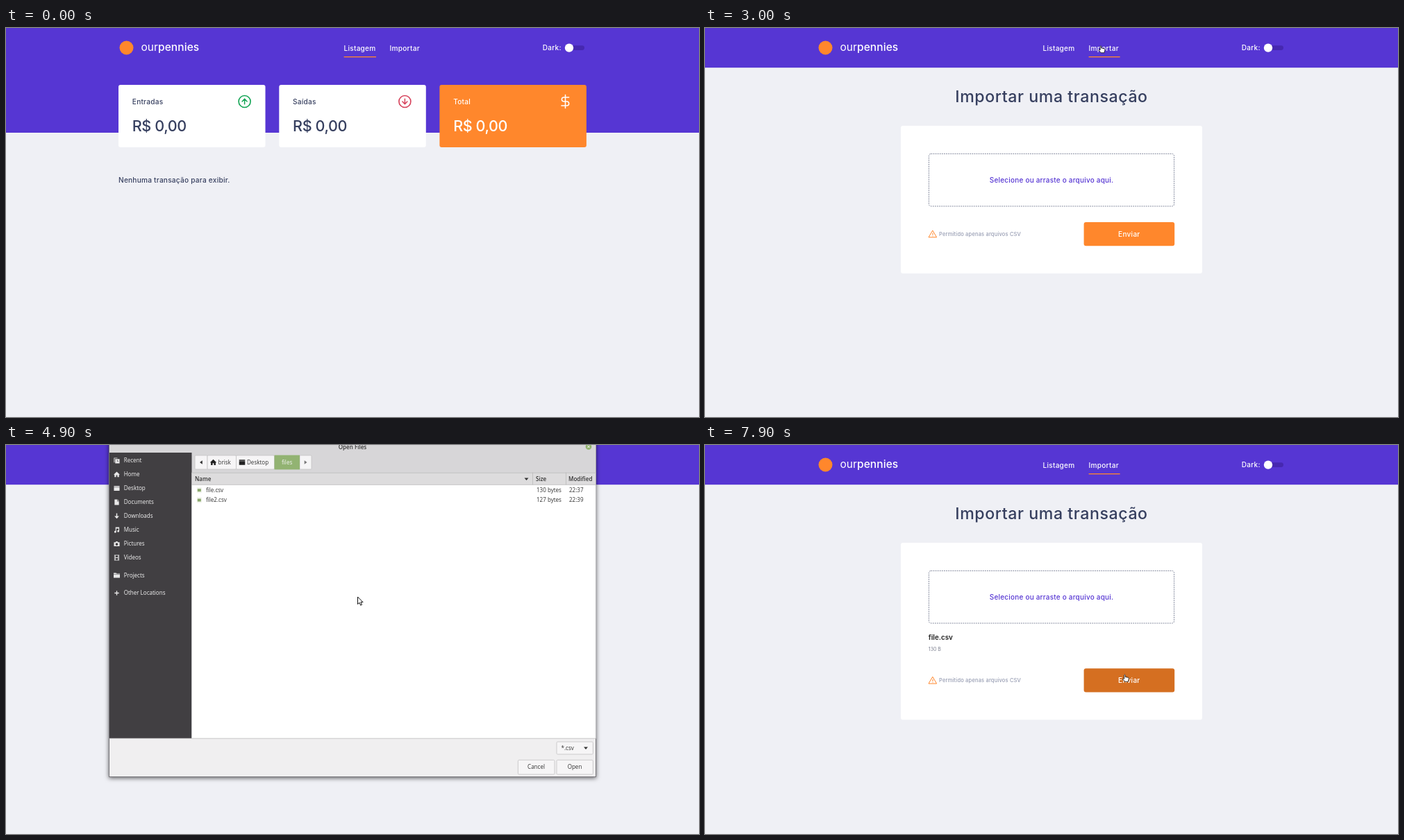
These frames come from a looping animation (998x561 px, 8 s). An HTML page:

```html
<!DOCTYPE html>
<html lang="pt-BR">
<head>
<meta charset="utf-8">
<title>Importar uma transação</title>
<style>
  html, body { margin: 0; width: 100%; height: 100%; overflow: hidden; background: #eff0f5; }
  svg { display: block; width: 998px; height: 561px; }
  text { font: 500 10.1px Inter, sans-serif; letter-spacing: .024em; fill: #363f5f; }
  .mid { text-anchor: middle; }
  .light { fill: #fff; }
  .money { font-size: 21.6px; letter-spacing: -.02em; }
  .title { font-size: 23.2px; }
  .brand { font-size: 15.5px; letter-spacing: .005em; }
  .thin { font-weight: 400; }
  .drop { font-size: 10px; letter-spacing: .02em; fill: #5636d3; }
  .note { font-size: 7.5px; fill: #969cb2; }
  .size { font-size: 7px; letter-spacing: 0; font-weight: 400; fill: #7d8090; }
  .name { font-size: 9.7px; letter-spacing: 0; font-weight: 700; fill: #333; }
  .line { fill: none; stroke-linecap: round; stroke-linejoin: round; }
  #dialog text { font: 400 8.05px "Open Sans", sans-serif; letter-spacing: 0; fill: #333; }
  #dialog .light { fill: #f4f4f4; }
  #dialog .bold { font-weight: 600; }
  #dialog .box { fill: #f6f5f6; stroke: #c3c2c3; stroke-width: .8; }
  #dialog .icon { fill-rule: evenodd; }
</style>
</head>
<body>
<svg id="stage" viewBox="0 0 998 561"></svg>
<script>
const DURATION = 8000, ORANGE = [255, 135, 44], DARK_ORANGE = [213, 111, 33];
const text = (x, y, s, cls = '') => `<text x="${x}" y="${y}" class="${cls}">${s}</text>`;
const rect = (x, y, w, h, fill, r = 0) =>
  `<rect x="${x}" y="${y}" width="${w}" height="${h}" rx="${r}" fill="${fill}"/>`;
const line = (d, color, w = 1.5) => `<path class="line" d="${d}" stroke="${color}" stroke-width="${w}"/>`;
const box = (x, y, w, h) => `<rect class="box" x="${x}" y="${y}" width="${w}" height="${h}" rx="1.5"/>`;
const icon = (x, y, d, fill, scale = 1) =>
  `<path class="icon" transform="translate(${x} ${y}) scale(${scale})" d="${d}" fill="${fill}"/>`;

const SHAPES = {
  recent: 'M-4.5-4.5H1V-3.5H-3.5V3H-4.5ZM-2.5-2.5H4.5V4.5H-2.5ZM.5-1V1.5H3V.7H1.3V-1Z',
  home: 'M-5 .3L0-4.5 5 .3H3.6V4.2H1V1.2H-1V4.2H-3.6V.3Z',
  desktop: 'M-4.5-4H4.5V-2.5H-4.5ZM-4.5-1.9H4.5V4H-4.5Z',
  page: 'M-3.5-4.5H.7V-1.5H3.5V4.5H-3.5ZM1.3-4.5L3.5-2.1H1.3Z',
  down: 'M-.8-4.5H.8V0H3.8L0 4.2-3.8 0H-.8Z',
  music: 'M-2-4.5H4V2A1.6 1.6 0 1 1 2.8.5V-2.2H-.8V3A1.6 1.6 0 1 1-2 1.5Z',
  camera: 'M-4.5-2.5H-2L-1-4H1L2-2.5H4.5V3.8H-4.5ZM0-1.3a2 2 0 1 0 .01 0Z',
  film: 'M-4-4.5H4V4.5H-4ZM-1.8-3.5V-.5H1.8V-3.5ZM-1.8.5V3.5H1.8V.5ZM-3.2-3.5V3.5H-2.6V-3.5ZM2.6-3.5V3.5H3.2V-3.5Z',
  folder: 'M-5-4H-1L0-2.8H5V-2H-5ZM-5-1.5H5V4H-5Z',
  plus: 'M-.7-3.5H.7V-.7H3.5V.7H.7V3.5H-.7V.7H-3.5V-.7H-.7Z'
};

function card(x, label, back, cls, mark) {
  return rect(x, 82, 211.5, 90, back, 3) + text(x + 19.8, 109.7, label, cls) +
    text(x + 19.8, 149.2, 'R$ 0,00', 'money ' + cls) + mark;
}

function roundArrow(x, color, dir) {
  return `<circle cx="${x}" cy="106" r="8.5" fill="none" stroke="${color}" stroke-width="1.6"/>` +
    line(`M${x} ${106 - 3.7 * dir}V${106 + 3.7 * dir}M${x - 3.5} 106L${x} ${106 - 3.7 * dir}L${x + 3.5} 106`, color);
}

const dollar = `<path class="line" transform="translate(795.2 95.7) scale(.86)" stroke="#fff" stroke-width="1.8"
  d="M12 1V23M18 5H9.5a3.5 3.5 0 0 0 0 7h5a3.5 3.5 0 0 1 0 7H5.5"/>`;

const header = `
  <rect id="band" width="998" fill="#5636d3"/>
  <circle cx="173.5" cy="28.5" r="10" fill="#ff872c"/>
  <text x="194.5" y="33" class="brand light"><tspan class="thin">our</tspan>pennies</text>
  ${text(486.5, 32.7, 'Listagem', 'light')}${text(552.6, 32.7, 'Importar', 'light')}
  <rect id="underline" y="41" height="1.3" fill="#ff872c"/>
  ${text(772.7, 32.2, 'Dark:', 'light')}
  ${rect(807, 25.2, 26, 6.8, '#4628b0', 3.4)}<circle cx="811" cy="28.6" r="6.2" fill="#fff"/>`;

const listing = `<g id="listing">
  ${card(162, 'Entradas', '#fff', '', roundArrow(343.6, '#12a454', 1))}
  ${card(393.3, 'Saídas', '#fff', '', roundArrow(574.4, '#d6405a', -1))}
  ${card(624.4, 'Total', '#ff872c', 'light', dollar)}
  ${text(162, 223.3, 'Nenhuma transação para exibir.')}
</g>`;

const form = `<g id="form">
  ${text(499, 107, 'Importar uma transação', 'title mid')}
  <rect id="panel" x="282" y="141" width="434" rx="3" fill="#fff"/>
  <rect x="322.4" y="181.4" width="353.2" height="75.6" rx="3" fill="none" stroke="#82889c"
    stroke-width="1" stroke-dasharray="1.9 1.2"/>
  ${text(499, 222.6, 'Selecione ou arraste o arquivo aqui.', 'drop mid')}
  <g id="chosen">${text(321.8, 281.2, 'file.csv', 'name')}${text(321.8, 296.6, '130 B', 'size')}</g>
  <g id="foot">
    ${line('M328 292.3L333.6 301.8H322.4ZM328 295.8V298.3M328 300V300.1', '#ff872c', 1)}
    ${text(337, 299.8, 'Permitido apenas arquivos CSV', 'note')}
    <rect id="send" x="545.6" y="280" width="130.6" height="34.2" rx="3"/>
    ${text(610.8, 300.6, 'Enviar', 'light mid')}
  </g>
</g>`;

const places = [
  ['Recent', 22.5, 'recent'], ['Home', 42.5, 'home'], ['Desktop', 62.5, 'desktop'],
  ['Documents', 82.5, 'page'], ['Downloads', 102.5, 'down'], ['Music', 122.5, 'music'],
  ['Pictures', 142.5, 'camera'], ['Videos', 162.5, 'film'], ['Projects', 188, 'folder'],
  ['Other Locations', 213.5, 'plus']
];

function fileRow(y, name, size, time, cls) {
  return rect(274.8, y - 4.3, 7, 8.6, '#f2f4ee', .8) + rect(275.8, y - 1.8, 5, 4, '#8aa86c') +
    text(288, y + 2.9, name, cls) + text(764, y + 2.9, size, cls) + text(811, y + 2.9, time, cls);
}

const dialog = `<g id="dialog">
  <rect x="148.5" y="-8" width="701" height="486.5" fill="#f0eff0" stroke="#77757a" filter="url(#shadow)"/>
  ${rect(149, -8, 700.5, 48, '#d7d6d8')}
  ${text(499, 6, 'Open Files', 'bold mid')}
  <circle cx="839" cy="2.5" r="4.3" fill="#8fb16b"/>${line('M837.5 1L840.5 4M840.5 1L837.5 4', '#fff', 1)}
  ${rect(149, 11, 118.5, 412, '#413f42')}
  ${places.map(([s, y, k]) => icon(159.5, y, SHAPES[k], '#e8e8e8', .9) + text(169.7, y + 2.9, s, 'light')).join('')}
  ${box(272, 15, 18, 20)}${box(290, 15, 41.5, 20)}${box(331.5, 15, 55, 20)}${box(423, 15, 17, 20)}
  ${rect(386.5, 14.6, 36.5, 20.8, '#92b372')}
  ${icon(281, 25, 'M1.8-2.8V2.8L-2 0Z', '#333')}${icon(431.5, 25, 'M-1.8-2.8V2.8L2 0Z', '#777')}
  ${icon(298.5, 25, SHAPES.home, '#222', .95)}${text(305.5, 27.9, 'brisk')}
  ${icon(340, 25, SHAPES.desktop, '#222', .95)}${text(347, 27.9, 'Desktop')}
  ${text(404.7, 27.9, 'files', 'light mid')}
  ${rect(267.5, 40, 582, 17.5, '#dddcdd')}${rect(267.5, 57.5, 582, 365.5, '#fff')}
  ${line('M267.5 40.2H849.5M267.5 57.3H849.5M758.5 40V57M806.5 40V57M149 423.2H849.5', '#bcbbbc', .8)}
  ${text(272, 51.7, 'Name', 'bold')}${text(763, 51.7, 'Size', 'bold')}${text(810, 51.7, 'Modified', 'bold')}
  ${icon(749.5, 49, 'M-3-1.6H3L0 2Z', '#333')}
  <rect id="picked" x="267.5" y="58" width="582" height="14.3" fill="#92b372"/>
  <g id="firstRow">${fileRow(65, 'file.csv', '130 bytes', '22:37')}</g>
  ${fileRow(79.3, 'file2.csv', '127 bytes', '22:39')}
  ${box(793, 428, 52.3, 18)}${text(799.5, 439.9, '*.csv')}${icon(835, 437, 'M-3-1.6H3L0 2Z', '#333')}
  ${box(737.4, 454.3, 52.6, 20.7)}${text(763.5, 467.4, 'Cancel', 'mid')}
  ${box(793, 454.3, 52.3, 20.7)}${text(819, 467.4, 'Open', 'mid')}
</g>`;

const pointer = `<g id="pointer" fill="#fff" stroke="#111" stroke-width="1" stroke-linejoin="round">
  <path id="arrow" d="M0 0V10.6L2.5 8.4 4.2 12.2 6 11.3 4.4 7.7H7.6Z"/>
  <path id="hand" transform="scale(.82)" d="M-1 1Q0-.8 1 1V4.2L6 5.2Q7.6 5.8 7 8.2L6 12.5H.3L-3.6 8Q-3.4 6.2-1 7.6Z"/>
</g>`;

document.getElementById('stage').innerHTML = `<defs><filter id="shadow" x="-10%" y="-10%" width="120%" height="120%">
  <feDropShadow dx="0" dy="1.5" stdDeviation="3" flood-opacity=".6"/></filter></defs>` +
  header + listing + form + dialog + pointer;

// Resting points of the pointer: time, x, y
const route = [
  [100, 960, 328], [500, 720, 262], [900, 455, 225], [1200, 414, 213], [1400, 324, 150],
  [1600, 560, 105], [1800, 797, 115], [2000, 798, 200], [2300, 660, 150], [2700, 570, 25.5],
  [3800, 570, 25.5], [4100, 480, 284], [4400, 506.5, 219], [4900, 506.5, 219], [5500, 412, 72],
  [5800, 408.7, 68.5], [6300, 407, 67], [6900, 407, 67], [7300, 392, 43], [7750, 604.5, 331], [8000, 604.5, 331]
];

function pointerAt(t) {
  const i = Math.max(1, route.findIndex(p => p[0] > t));
  const [t0, x0, y0] = route[i - 1], [t1, x1, y1] = route[i];
  const u = Math.max(0, (t - t0) / (t1 - t0)), e = u * u * (3 - 2 * u);
  return [x0 + (x1 - x0) * e, y0 + (y1 - y0) * e];
}

const el = id => document.getElementById(id);
const show = (id, on) => { el(id).style.display = on ? '' : 'none'; };
const set = (id, key, value) => el(id).setAttribute(key, value);

function draw(t) {
  const importing = t >= 3000, open = t >= 4900 && t < 6500, loaded = t >= 6500, picked = t >= 5600;
  const shift = loaded ? 42.3 : 0;
  const [x, y] = pointerAt(t);
  const inside = (l, top, r, b) => x >= l && x <= r && y >= top && y <= b;
  const busy = t >= 4600 && t < 6500;
  const hand = !busy && (inside(487, 18, 533, 43) || inside(553, 18, 598, 43) ||
    importing && (inside(322, 181, 676, 257) || inside(546, 280 + shift, 676, 314 + shift)));

  set('band', 'height', importing ? 57.2 : 151);
  set('underline', 'x', importing ? 552.6 : 486.6);
  set('underline', 'width', importing ? 45 : 46.4);
  show('listing', !importing);
  show('form', importing);
  show('chosen', loaded);
  set('panel', 'height', 213 + shift);
  set('foot', 'transform', `translate(0 ${shift})`);
  const dark = Math.min(1, Math.max(0, (t - 7650) / 200));
  set('send', 'fill', `rgb(${ORANGE.map((c, i) => Math.round(c + (DARK_ORANGE[i] - c) * dark))})`);

  show('dialog', open);
  show('picked', picked);
  set('firstRow', 'class', picked ? 'on' : '');
  for (const n of el('firstRow').querySelectorAll('text')) n.classList.toggle('light', picked);

  show('pointer', t >= 100);
  set('pointer', 'transform', `translate(${x} ${y})`);
  show('arrow', !hand);
  show('hand', hand);
}

const start = performance.now();
function tick() {
  const t = (performance.now() - start) % DURATION;
  draw(Math.floor(t / 100) * 100);
  requestAnimationFrame(tick);
}
tick();
</script>
</body>
</html>
```
